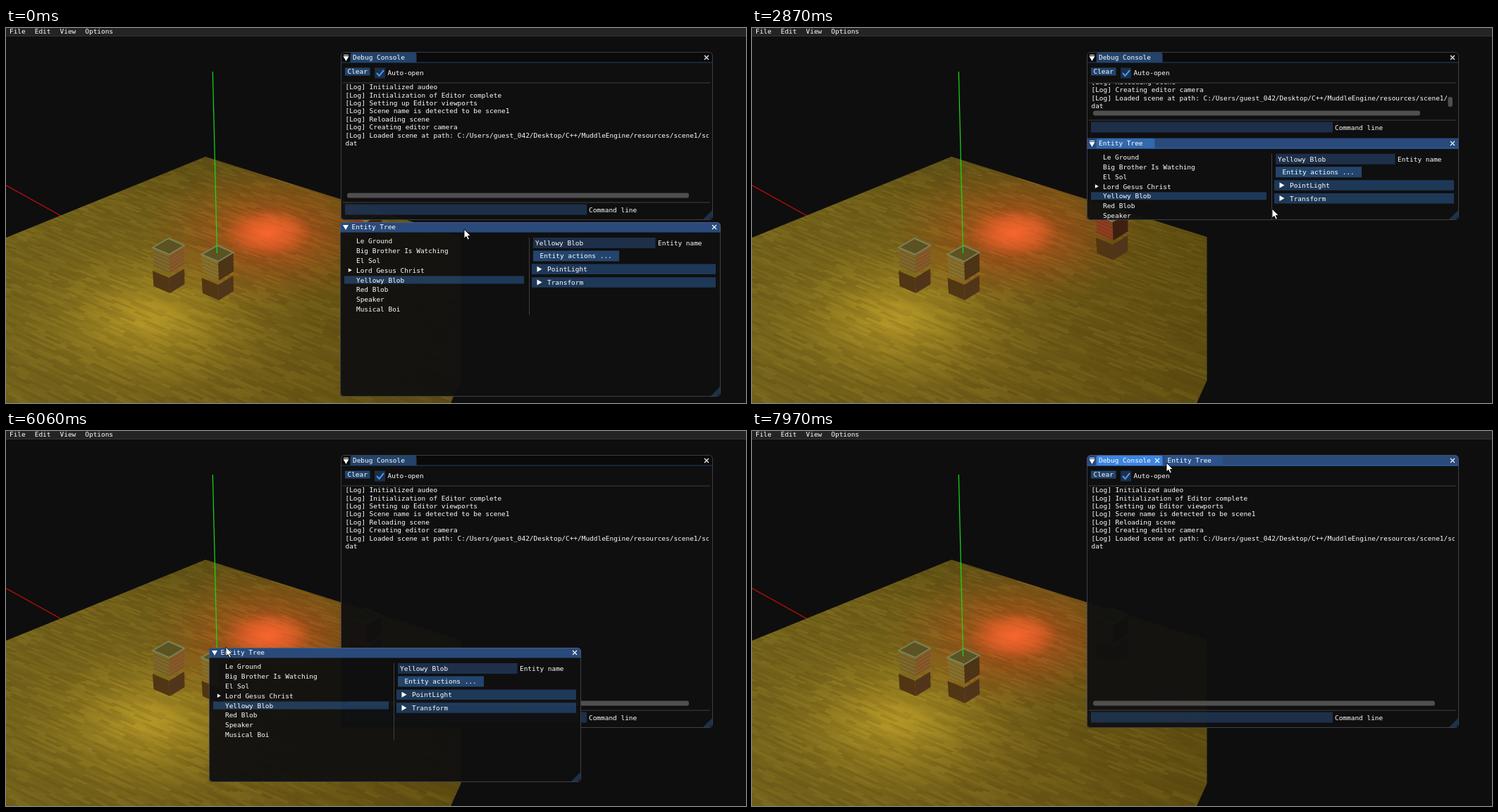
Animation, 1050 px wide and 533 px high, one loop 8000 ms. Source, as an HTML page with a canvas:

```html
<!DOCTYPE html>
<html lang="en">
<head>
<meta charset="utf-8">
<title>Docking panels</title>
<style>
html, body { margin: 0; width: 100%; height: 100%; overflow: hidden; background: #0e0e0e; }
canvas { display: block; }
</style>
</head>
<body>
<canvas id="stage" width="1050" height="533"></canvas>
<script>
const W = 1050, H = 533, LOOP = 8000;
const stage = document.getElementById('stage').getContext('2d');
let g = stage;

const FONT = '9.45px "DejaVu Sans Mono", monospace';
const COLOR = {
  panel: 'rgba(15,15,15,.94)', border: 'rgba(110,110,128,.5)',
  title: '#294a7a', titleIdle: '#0a0a0a',
  tab: '#3369ad', tabIdle: '#23436b', tabBack: '#2b5289', tabHover: '#3d85e0',
  frame: 'rgba(41,74,122,.54)', button: 'rgba(66,150,250,.4)',
  header: 'rgba(66,150,250,.31)', grip: 'rgba(66,150,250,.25)',
  preview: 'rgba(66,150,250,.27)', accent: '#4296fa', scroll: '#4f4f4f'
};
const HOST = { x: 475, y: 34, w: 527, small: 272, tall: 421 };
const ENTITIES = ['Le Ground', 'Big Brother Is Watching', 'El Sol', 'Lord Gesus Christ',
  'Yellowy Blob', 'Red Blob', 'Speaker', 'Musical Boi'];
const LOG = ['[Log] Initialized audeo', '[Log] Initialization of Editor complete',
  '[Log] Setting up Editor viewports', '[Log] Scene name is detected to be scene1',
  '[Log] Reloading scene', '[Log] Creating editor camera',
  '[Log] Loaded scene at path: C:/Users/guest_042/Desktop/C++/MuddleEngine/resources/scene1/scene1.', 'dat'];

const BIG = { w: 539, h: 247, grab: [176, 7], host: HOST.small };
const SMALL = { w: 527, h: 190, grab: [46, 8], host: HOST.tall };

// Each move takes evenly timed steps along a line (two points) or a curve (three).
// The path is the window's while dragging, else the pointer's; split adds the host's bottom edge.
const moves = [
  { kind: 'idle', from: 0, to: 420, steps: 5, path: [[650, 286], [645, 281], [651, 283]] },
  { kind: 'drag', win: BIG, from: 980, to: 1320, steps: 4, path: [[430, 290], [198, 219]] },
  { kind: 'drag', win: BIG, from: 1630, to: 2050, steps: 3, path: [[226, 232], [443, 298]] },
  { kind: 'drag', win: BIG, dock: 'bottom', from: 2240, to: 2640, steps: 3, path: [[530, 290], [562, 249]] },
  { kind: 'split', from: 2870, to: 3000, steps: 2, path: [[738, 257, 272], [738, 256, 272]] },
  { kind: 'split', from: 3290, to: 3530, steps: 4, path: [[800, 262, 272], [999, 274, 272]] },
  { kind: 'split', from: 3610, to: 3860, steps: 4, path: [[999, 280, 272], [999, 371, 356]] },
  { kind: 'split', from: 4020, to: 4160, steps: 3, path: [[999, 405, 390], [999, 419, 421]] },
  { kind: 'split', from: 4380, to: 4740, steps: 4, path: [[940, 380, 421], [521, 238, 421]] },
  { kind: 'drag', win: SMALL, lead: .44, from: 4860, to: 5340, steps: 5, path: [[460, 230], [553, 270], [222, 285]] },
  { kind: 'drag', win: SMALL, lead: .44, from: 5480, to: 6060, steps: 8, path: [[240, 288], [420, 312], [288, 308]] },
  { kind: 'drag', win: SMALL, lead: .44, from: 6120, to: 6420, steps: 4, path: [[238, 288], [225, 200], [457, 134]] },
  { kind: 'drag', win: SMALL, dock: 'tab', from: 6540, to: 7030, steps: 4, path: [[560, 70], [650, 25], [662, 34]] },
  { kind: 'tabs', from: 7440, to: 7440, steps: 1, path: [[708, 42]] },
  { kind: 'tabs', from: 7630, to: 7970, steps: 6, path: [[690, 44], [440, 43], [588, 45]] }
];
const CONSOLE_CLICK = 7830;

function along(path, u) {
  const a = path[0], c = path[path.length - 1];
  return a.map((v, i) => {
    const mid = path.length === 3 ? path[1][i] : (v + c[i]) / 2;
    return (1 - u) ** 2 * v + 2 * u * (1 - u) * mid + u * u * c[i];
  });
}
function poseAt(t) {
  const i = moves.findLastIndex(m => m.from <= t);
  const move = moves[i], last = move.steps - 1;
  const step = last ? Math.min(last, Math.floor((t - move.from) / (move.to - move.from) * last + 1e-6)) : 0;
  const at = k => along(move.path, last ? k / last : 0);
  const next = step < last ? at(step + 1) : moves[(i + 1) % moves.length].path[0];
  return { move, pos: at(step), next };
}

function random(seed) {
  return () => (seed = (seed * 16807) % 2147483647) / 2147483647;
}
function rect(x, y, w, h, color, r = 0) {
  g.fillStyle = color;
  g.beginPath();
  g.roundRect(x, y, w, h, r);
  g.fill();
}
function trace(points) {
  g.beginPath();
  points.forEach(p => g.lineTo(...p));
  g.closePath();
}
function poly(color, ...points) {
  trace(points);
  g.fillStyle = color;
  g.fill();
}
function line(color, x1, y1, x2, y2, width = 1) {
  g.strokeStyle = color;
  g.lineWidth = width;
  g.beginPath();
  g.moveTo(x1, y1);
  g.lineTo(x2, y2);
  g.stroke();
}
function text(s, x, y) {
  g.fillStyle = '#fff';
  g.fillText(s, x, y + 3.4);
}
function arrowDown(x, y) { poly('#fff', [x - 4, y - 3], [x + 4, y - 3], [x, y + 4]); }
function arrowRight(x, y, r) { poly('#fff', [x - r * .75, y - r], [x + r, y], [x - r * .75, y + r]); }
function cross(x, y) {
  for (const s of [-3, 3]) line('#fff', x - 3, y - s, x + 3, y + s, 1.1);
}
function grip(x, y) { poly(COLOR.grip, [x, y - 13], [x, y - 4], [x - 4, y], [x - 13, y]); }

// ---- 3D view ----
function glow(x, y, rx, ry, rgb, ...alphas) {
  g.save();
  g.translate(x, y);
  g.scale(rx, ry);
  const fill = g.createRadialGradient(0, 0, 0, 0, 0, 1);
  alphas.forEach((a, i) => fill.addColorStop(i / (alphas.length - 1), `rgba(${rgb},${a})`));
  g.fillStyle = fill;
  g.fillRect(-1, -1, 2, 2);
  g.restore();
}
// Perspective from floor coordinates, starting at the far corner.
function ground(a, b) {
  const d = 1 - a - b;
  return [(283 + 2317 * a - 2300 * b) / d, (183 + 636 * (a + b)) / d];
}
function planks() {
  const rnd = random(77), row = .0014;
  for (let b = 0; b < .23; b += row) {
    for (let a = -.006 * rnd(); a < .21;) {
      const len = .003 + rnd() * .008, v = rnd();
      const tint = v < .7 ? `rgba(45,28,0,${v * .2})` : `rgba(225,195,90,${(v - .7) * .22})`;
      poly(tint, ground(a, b), ground(a + len, b), ground(a + len, b + row), ground(a, b + row));
      a += len;
    }
  }
}
function boxSides(x, y, depth, left, right) {
  const l = [x - 22.5, y + 2], f = [x + 1, y + 12], r = [x + 22.5, y - 1];
  const drop = ([px, py], shift) => [px + shift, py + depth];
  poly(left, l, f, drop(f, 1), drop(l, 1.5));
  poly(right, f, r, drop(r, .5), drop(f, 1));
  return [l, f, r];
}
function crate(x, y, left, right) {
  boxSides(x, y + 33, 22, '#503613', '#51351a');
  const [l, f, r] = boxSides(x, y, 27, left, right);
  for (let i = 5; i < 26; i += 5) {
    line('rgba(50,28,5,.22)', l[0] + 1, l[1] + i, f[0], f[1] + i);
    line('rgba(50,28,5,.22)', f[0], f[1] + i, r[0], r[1] + i);
  }
  poly('#5c5222', [x, y - 11], r, f, l);
  g.strokeStyle = '#7b8455';
  g.lineWidth = 2;
  g.stroke();
}
function buildScene() {
  const layer = document.createElement('canvas');
  layer.width = W;
  layer.height = H;
  g = layer.getContext('2d');
  g.fillStyle = '#0e0e0e';
  g.fillRect(0, 0, W, H);
  line('#c80c0c', 0, 223.5, 79, 267.5, 1.2);

  g.save();
  trace([[0, 298], [283, 183], [645.5, 297], [645.5, 501], [631, 533], [0, 533]]);
  g.clip();
  const base = g.createLinearGradient(0, 400, 645, 430);
  base.addColorStop(0, '#75651b');
  base.addColorStop(.5, '#735f18');
  base.addColorStop(1, '#604f11');
  g.fillStyle = base;
  g.fillRect(0, 0, W, H);
  glow(283, 175, 270, 85, '72,62,16', .5, .25, 0);
  glow(205, 412, 220, 135, '198,166,42', .8, .55, .26, .08, 0);
  glow(374, 293, 185, 105, '205,75,28', .8, .56, .3, .1, 0);
  planks();
  glow(372, 291, 64, 35, '255,104,48', .9, .55, 0);
  g.restore();

  crate(230.5, 310, '#7d672a', '#875a2a');
  crate(300, 320, '#86702b', '#4d3516');
  crate(510.5, 263, '#8d3d20', '#3d2012');
  line('#12e012', 293.3, 62, 299.5, 320, 1.2);

  rect(0, 0, W, 11, '#242424');
  rect(0, 11, W, 1, '#343438');
  g.font = FONT;
  let x = 5;
  for (const s of ['File', 'Edit', 'View', 'Options']) {
    text(s, x, 5);
    x += s.length * 5.69 + 13;
  }
  g = stage;
  return layer;
}

// ---- panels ----
function panel(x, y, w, h) {
  rect(x, y, w + 1, h + 1, COLOR.panel, 5);
}
function outline(x, y, w, h) {
  g.strokeStyle = COLOR.border;
  g.lineWidth = 1;
  g.beginPath();
  g.roundRect(x + .5, y + .5, w, h, 5);
  g.stroke();
}
function tab(label, x, w, y, color) {
  rect(x, y + 1, w, 14, color, [3, 3, 0, 0]);
  text(label, x + 3.5, y + 8);
}
function tabBar(y, focused, corner) {
  rect(HOST.x + .5, y + .5, HOST.w, 15, focused ? COLOR.title : COLOR.titleIdle, [corner, corner, 0, 0]);
  rect(HOST.x + 1, y + 14.5, HOST.w - 1, 1, focused ? COLOR.tab : COLOR.tabIdle);
  line('#fff', 479, y + 4.5, 486, y + 4.5);
  arrowDown(482.5, y + 9);
  cross(994, y + 8);
}
function separator(y) {
  line(COLOR.border, 478, y, 999, y);
}
function consoleBody(bottom) {
  rect(481, 56.5, 35.5, 11, COLOR.button);
  text('Clear', 484.5, 62);
  rect(523, 56.5, 15, 15, COLOR.frame);
  g.strokeStyle = COLOR.accent;
  g.lineWidth = 2;
  g.beginPath();
  g.moveTo(526, 64);
  g.lineTo(529.5, 68);
  g.lineTo(536, 60);
  g.stroke();
  text('Auto-open', 541.5, 64);
  separator(78);

  const viewEnd = bottom - 40, scroll = Math.max(0, 168 - viewEnd), right = scroll ? 986 : 997;
  g.save();
  g.beginPath();
  g.rect(477, 79, right - 477, viewEnd - 79);
  g.clip();
  LOG.forEach((s, i) => text(s, 481.5, 84 + 11.35 * i - scroll));
  g.restore();
  if (scroll) {
    const view = viewEnd - 80, size = view * view / (view + scroll);
    rect(987.5, viewEnd - 3 - size, 6.5, size, COLOR.scroll, 3);
  }
  rect(484, bottom - 37.5, scroll ? 464 : 485, 7, COLOR.scroll, 3);
  separator(bottom - 24);
  rect(481, bottom - 21.5, 343, 15, COLOR.frame);
  text('Command line', 827, bottom - 13.8);
}
function entityBody(x, y, w) {
  const split = Math.round(x + w / 2 - 1.5), left = split + 6, right = x + w - 6;
  rect(x + 6, y + 76.5, split - 7 - x - 6, 11, COLOR.header);
  ENTITIES.forEach((s, i) => text(s, x + 23, y + 27 + 13.8 * i));
  arrowRight(x + 14, y + 68.3, 2.8);
  line(COLOR.border, split + .5, y + 22, split + .5, y + 132);
  const field = (right - left) * .67;
  rect(left, y + 22, field, 15, COLOR.frame);
  text('Yellowy Blob', left + 3, y + 29.5);
  text('Entity name', left + field + 3.5, y + 29.5);
  rect(left, y + 40.5, 122, 15, COLOR.button);
  text('Entity actions ...', left + 9.5, y + 48);
  ['PointLight', 'Transform'].forEach((s, i) => {
    const top = y + 59.5 + 18.7 * i;
    rect(left - 2, top, right - left + 2, 14.5, COLOR.header);
    arrowRight(left + 8.5, top + 7.2, 4);
    text(s, left + 20, top + 7.2);
  });
}
function consoleWindow(bottom) {
  panel(HOST.x, HOST.y, HOST.w, bottom - HOST.y);
  tabBar(HOST.y, false, 5);
  tab('Debug Console', 488.5, 94, HOST.y, COLOR.tabIdle);
  consoleBody(bottom);
  grip(HOST.x + HOST.w, bottom);
  outline(HOST.x, HOST.y, HOST.w, bottom - HOST.y);
}
function entityWindow(x, y, { w, h }) {
  panel(x, y, w, h);
  rect(x, y, w + 1, 14.5, COLOR.title, [5, 5, 0, 0]);
  arrowDown(x + 8, y + 7);
  text('Entity Tree', x + 16.5, y + 7);
  cross(x + w - 8, y + 7);
  entityBody(x, y, w);
  grip(x + w, y + h);
  outline(x, y, w, h);
}
const splitAt = bottom => Math.round(HOST.y + (bottom - HOST.y) * .507) + 1;

function splitHost(bottom, resizing) {
  const y = splitAt(bottom), h = bottom - HOST.y;
  panel(HOST.x, HOST.y, HOST.w, h);
  tabBar(HOST.y, false, 5);
  tab('Debug Console', 488.5, 94, HOST.y, COLOR.tabIdle);
  consoleBody(y - 1);
  tabBar(y, true, 0);
  tab('Entity Tree', 488.5, 83, y, COLOR.tab);
  g.save();
  g.beginPath();
  g.rect(HOST.x, y, HOST.w, bottom - y);
  g.clip();
  entityBody(HOST.x, y + .7, HOST.w);
  g.restore();
  grip(HOST.x + HOST.w, bottom);
  outline(HOST.x, HOST.y, HOST.w, h);
  if (resizing) line('#3574c8', 479, bottom, 998, bottom, 2);
}
function tabHost(showConsole, pointerX) {
  const h = HOST.tall - HOST.y;
  const hover = pointerX < 589 ? 0 : pointerX < 668 ? 1 : -1;
  const shade = (i, active) => hover === i ? COLOR.tabHover : active ? COLOR.tab : COLOR.tabBack;
  panel(HOST.x, HOST.y, HOST.w, h);
  tabBar(HOST.y, true, 5);
  tab('Debug Console', 488.5, 94, HOST.y, shade(0, showConsole));
  tab('Entity Tree', 586, 82, HOST.y, shade(1, !showConsole));
  if (hover >= 0) cross(575 + hover * 86, 42);
  if (showConsole) consoleBody(HOST.tall);
  else entityBody(HOST.x, HOST.y + .7, HOST.w);
  grip(HOST.x + HOST.w, HOST.tall);
  outline(HOST.x, HOST.y, HOST.w, h);
}

// ---- docking targets ----
function target(cx, cy, w, h, divider) {
  const edge = 'rgba(140,190,250,.65)', x = cx - w / 2, y = cy - h / 2;
  rect(x, y, w, h, 'rgba(66,150,250,.42)', 3);
  g.strokeStyle = edge;
  g.lineWidth = 1;
  g.strokeRect(x + 1.5, y + 1.5, w - 3, h - 3);
  if (divider === 'h') line(edge, x + 2, cy, x + w - 2, cy);
  if (divider === 'v') line(edge, cx, y + 2, cx, y + h - 2);
}
function dockOverlay(kind, bottom) {
  const cx = 738.5, cy = (HOST.y + bottom) / 2;
  const top = kind === 'tab' ? 50 : splitAt(bottom);
  rect(HOST.x + 1, top, HOST.w, bottom - top, COLOR.preview, [0, 0, 5, 5]);
  target(cx, cy, 30, 30);
  for (const s of [-1, 1]) {
    target(cx, cy + 36.5 * s, 30, 27, 'h');
    target(cx + 36.5 * s, cy, 27, 30, 'v');
    target(cx + 251 * s, cy, 23, 46, 'v');
    target(cx, cy + ((bottom - HOST.y) / 2 - 12.5) * s, 46, 23, 'h');
  }
}

function pointer(x, y) {
  g.save();
  g.translate(x, y);
  trace([[0, 0], [0, 13], [3, 10.3], [5.2, 15], [7.4, 14], [5.3, 9.5], [9.2, 9.2]]);
  g.fillStyle = '#fff';
  g.strokeStyle = '#000';
  g.lineWidth = .9;
  g.fill();
  g.stroke();
  g.restore();
}
function resizePointer(x, y) {
  line('#000', x, y - 7, x, y + 7, 3);
  line('#fff', x, y - 6, x, y + 6, 1.4);
  for (const s of [-1, 1]) poly('#fff', [x - 3.6, y + 4.5 * s], [x + 3.6, y + 4.5 * s], [x, y + 8.8 * s]);
}

// ---- timeline ----
function drawDrag({ win, dock, lead = 0 }, [x, y], next) {
  const px = x + win.grab[0] + lead * (next[0] - x);
  const py = y + win.grab[1] + lead * (next[1] - y);
  const docking = dock && px > HOST.x && py < win.host;
  consoleWindow(win.host);
  if (docking && dock === 'tab') tab('Entity Tree', 586, 82, HOST.y, COLOR.tab);
  entityWindow(Math.round(x), Math.round(y), win);
  if (docking) dockOverlay(dock, win.host);
  pointer(px, py);
}
function draw(t) {
  g.drawImage(scene, 0, 0);
  g.font = FONT;
  const { move, pos, next } = poseAt(t);
  const [x, y] = pos;
  if (move.kind === 'drag') {
    drawDrag(move, pos, next);
  } else if (move.kind === 'split') {
    const resizing = x > 990;
    splitHost(Math.round(pos[2]), resizing);
    (resizing ? resizePointer : pointer)(x, y);
  } else if (move.kind === 'tabs') {
    tabHost(t >= CONSOLE_CLICK, x);
    pointer(x, y);
  } else {
    consoleWindow(HOST.small);
    entityWindow(474, 276, BIG);
    pointer(x, y);
  }
}

const scene = buildScene();
const start = performance.now();
function tick() {
  draw((performance.now() - start) % LOOP);
  requestAnimationFrame(tick);
}
tick();
</script>
</body>
</html>
```
